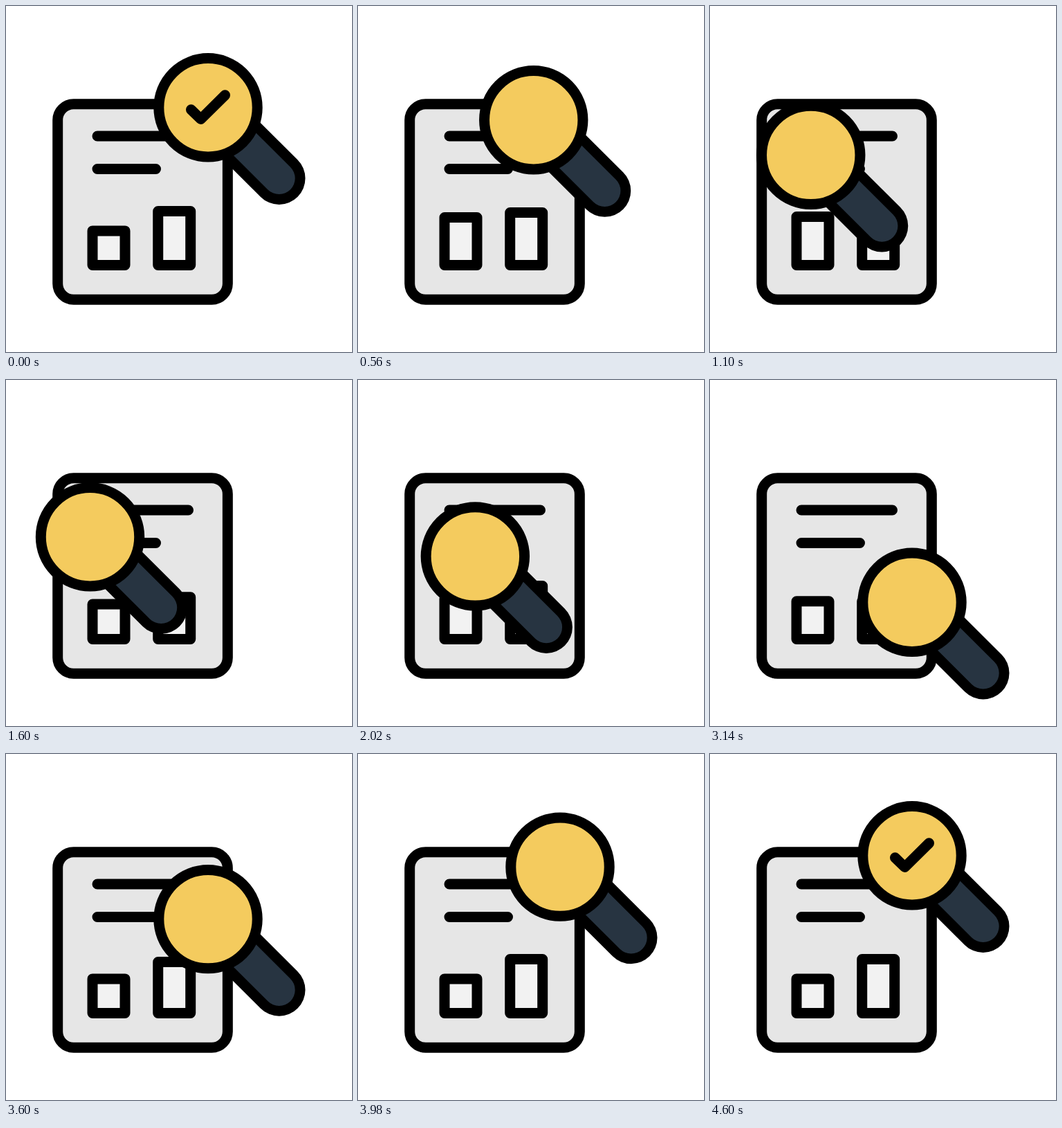
An HTML page for the animation above (4820 ms loop, 500 by 500 pixels).

```html
<!DOCTYPE html>
<html lang="en">
<head>
<meta charset="utf-8">
<title>Report check</title>
<style>
  html, body { margin: 0; width: 100%; height: 100%; overflow: hidden; background: #fff; }
  svg { display: block; width: 100%; height: 100%; }
  svg * { stroke: #000; stroke-width: 15; stroke-linecap: round; stroke-linejoin: round; }
</style>
</head>
<body>
<svg viewBox="0 0 500 500">
  <rect x="74.7" y="141.7" width="245.6" height="282.6" rx="23" fill="#e6e6e6"/>
  <path d="M132 188H263.5M132 235.5H216.5" fill="none"/>
  <path id="leftBar" fill="#f2f2f2"/>
  <path id="rightBar" fill="#f2f2f2"/>
  <g id="glass">
    <path d="M0 0L102.7 102.3" style="stroke-width:75.6"/>
    <path d="M0 0L102.7 102.3" style="stroke:#273441;stroke-width:46"/>
    <circle r="71.2" fill="#f4cb5e"/>
    <path id="tick" d="M-24.5 3L-10.5 16.7L24.5 -18" fill="none" pathLength="100"/>
  </g>
</svg>
<script>
  const LOOP = 4820, MOVE = 1184, LEG = 1409.5, FIRST = 198, BAR_PERIOD = 1691;
  const stops = [[292, 146.8], [121.5, 226.8], [292, 326.8], [292, 146.8]];
  const $ = id => document.getElementById(id);

  const progress = (t, start, length) => Math.min(1, Math.max(0, (t - start) / length));
  const ease = s => s * s * (3 - 2 * s);

  // Two eased there-and-back swings.
  function swing(t, start) {
    const phase = 2 * progress(t, start, 2 * BAR_PERIOD) % 1;
    return ease(1 - Math.abs(1 - 2 * phase));
  }

  function drawBar(id, x, top) {
    $(id).setAttribute('d', `M${x} ${top}h47V374.5h-47Z`);
  }

  function glassPosition(t) {
    let [x, y] = stops[0];
    for (let i = 0; i < 3; i++) {
      const k = ease(progress(t, FIRST + i * LEG, MOVE));
      x += (stops[i + 1][0] - stops[i][0]) * k;
      y += (stops[i + 1][1] - stops[i][1]) * k;
    }
    return [x, y];
  }

  function render(t) {
    drawBar('leftBar', 125, 324.9 - 26.2 * swing(t, 0));
    drawBar('rightBar', 219.7, 296.6 + 26.2 * swing(t, 423));
    $('glass').setAttribute('transform', `translate(${glassPosition(t)})`);

    const shown = 1 - ease(progress(t, 20, 178)) + ease(progress(t, 4201, 395));
    const tick = $('tick');
    tick.style.display = shown > 0.001 ? '' : 'none';
    tick.style.strokeDasharray = shown < 1 ? `${shown * 100} 300` : 'none';
  }

  const begin = performance.now();
  function frame() {
    render((performance.now() - begin) % LOOP);
    requestAnimationFrame(frame);
  }
  frame();
</script>
</body>
</html>
```
